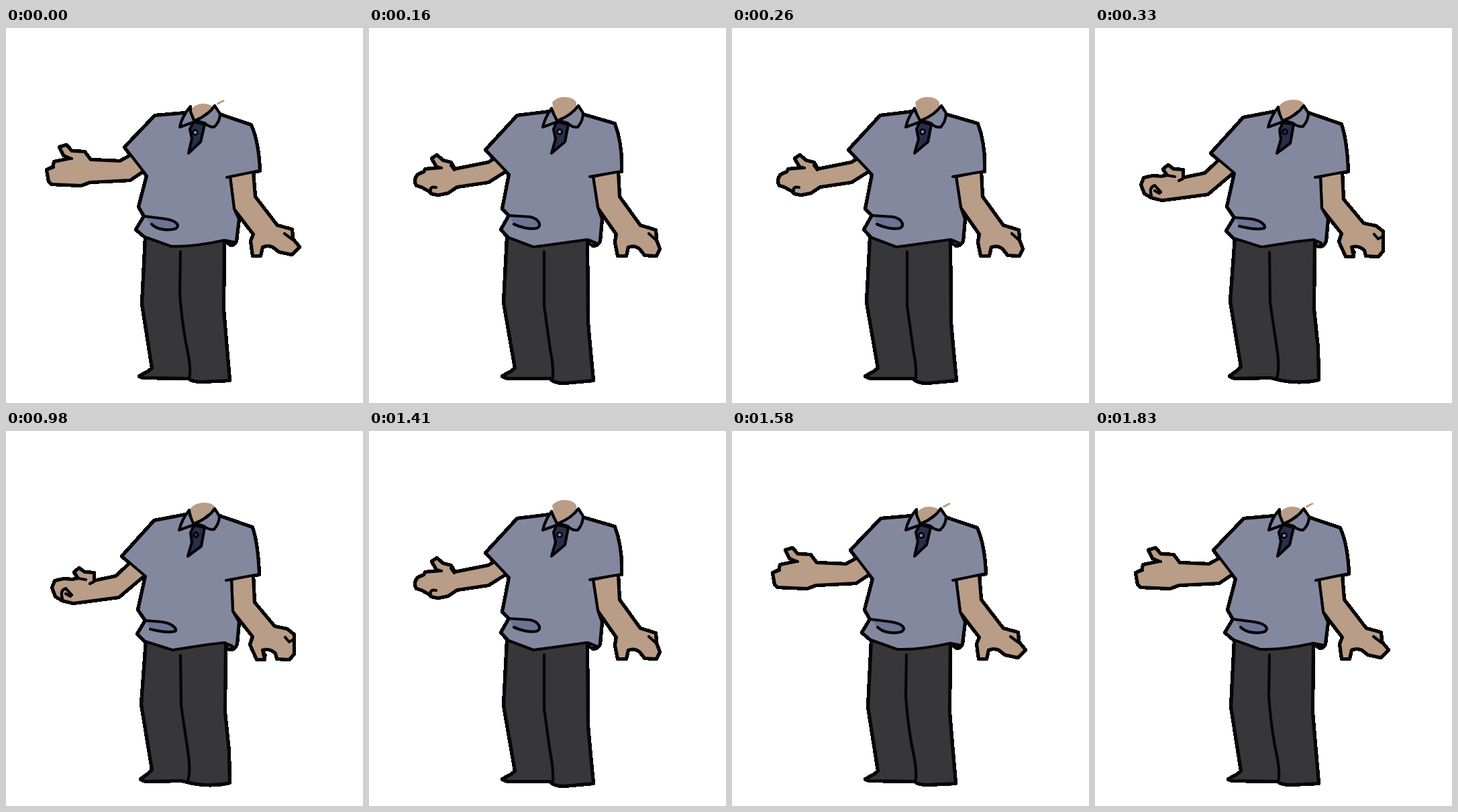
Write an HTML page that moves like this. It is 532 px wide and 560 px high and loops after 2000 ms.

```html
<!DOCTYPE html>
<html lang="en">
<head>
<meta charset="utf-8">
<title>Shrugging figure</title>
<style>
  html, body { margin: 0; width: 100%; height: 100%; overflow: hidden; background: #fff; }
  svg { display: block; width: 100%; height: 100%; }
  path, circle { stroke: #050507; stroke-width: 4.2; stroke-linejoin: round; stroke-linecap: round; }
  .edge { stroke: #000; stroke-width: 6.4; shape-rendering: crispEdges; }
  .skin { fill: #b99d87; }
  .shirt { fill: #84889f; }
  .shade { fill: #6e7396; }
  .dark { fill: #373739; }
  .navy { fill: #2a2e4c; }
  .line { fill: none; }
  .bare { stroke: none; }
</style>
</head>
<body>
<svg id="stage" viewBox="0 0 532 560"></svg>
<script>
const LOOP = 2000;
const SVG = "http://www.w3.org/2000/svg";

// Part name -> css class, in painting order.
const PARTS = {
  pants: "dark", seam: "line",
  armL: "skin", armR: "skin", fingers: "line",
  shirt: "shirt", lining: "shade", fold: "shade",
  neck: "skin bare", spike: "skin bare",
  placket: "navy", collarL: "shirt", collarR: "shirt"
};
const OUTER = ["pants", "armL", "armR", "shirt"];

const open = {
  pants: "M208 313L203 412L218 508L212 513L199 520L204 522L272 523Q278 528 292 528L333 526L329 480L324 420L325 316Z",
  seam: "M260 334L259 395Q261 430 268 470Q277 510 273 523",
  armL: "M188 189L170 199L126 197L117 185L98 184L90 175L80 178L86 190L96 195L72 200L70 208L61 212L64 229L68 233L112 235L125 230L185 227L207 212Z",
  armR: "M334 222L340 270L369 308L365 318L368 340L379 340L382 327Q390 323 398 327L407 334L426 338L437 327L427 315L426 301L404 295L371 252L368 214Z",
  fingers: "M86 191L98 195M62 211L71 208M415 307L427 316",
  lining: "M326 317L341 320L335 324Z",
  shirt: "M222 131L268 127L318 129L365 145C374 165 377 190 378 213L329 223L334 222L340 270L347 285L343 318Q341 324 335 324L325 317Q280 327 246 326L207 312L194 301L206 281L198 267L210 221L177 178Z",
  fold: "M206 281L237 285C256 288 260 296 252 300C240 303 225 301 217 293",
  neck: "M275 122Q283 113 293 113Q303 113 309 118L281 139Z",
  spike: "M314 112L324 107L326 109L315 115Z",
  placket: "M280 140L296 144L290 170L272 187L277 165L274 151Z",
  collarL: "M275 117Q262 132 259 148Q270 144 281 140L275 125Z",
  collarR: "M311 116Q302 130 282 138L296 142Q302 148 310 148Q319 140 319 128Z",
  button: [282, 156, "#84889f"]
};

const half = {
  pants: "M206 313L201 410L218 508L212 513L199 520L206 523L270 523Q276 530 290 530L334 526L330 485L326 440L325 316Z",
  seam: "M261 334L261 415L270 480Q275 505 274 522",
  armL: "M188 195L178 201L128 211L122 201L110 198L101 190L94 195L101 207L108 209L84 211L82 215L73 219Q66 227 71 235L78 237L89 243L93 247L103 249L118 246L131 237L178 230L205 213Z",
  armR: "M334 222L341 268L369 308L367 320L371 340L383 340L386 327Q396 323 404 330L411 339L428 340L433 330L428 317L427 302L404 295L373 252L371 214Z",
  fingers: "M98 208L108 209M122 205L127 212M92 244Q90 236 100 238M417 307L428 317",
  lining: "M326 316L338 321L336 325L329 323Z",
  shirt: "M221 131L270 125L318 129L366 143C374 165 377 190 376 214L329 222L334 222L341 268L347 285L344 318Q341 325 334 325L325 316L245 327L208 313L197 301L209 280L199 270L209 219L174 182Z",
  fold: "M209 280L240 282C254 285 258 296 250 299C240 301 226 298 216 293",
  neck: "M273 111Q280 103 291 103Q304 103 309 111L309 120L281 139L275 122Z",
  spike: "",
  placket: "M280 140L297 144L292 170L272 187L278 166L275 151Z",
  collarL: "M272 120Q262 134 259 148Q270 144 281 140L274 126Z",
  collarR: "M312 116Q302 130 282 138L296 142Q303 149 311 148Q319 139 319 127Z",
  button: [284, 155, "#84889f"]
};

const shrug = {
  pants: "M209 313L202 408L218 506L212 512L201 520L208 523L262 522Q300 533 333 525L332 478L326 420L327 316Z",
  seam: "M260 335L261 410Q266 445 272 485Q275 510 271 523",
  armL: "M185 197L164 217L131 224L131 212L117 211L109 205L102 211L108 220L99 222L86 221L73 224L69 234L74 247L84 253L100 257L168 248L207 215Z",
  armR: "M336 222L338 269L368 307L364 319L374 341L385 341L382 327Q393 323 402 332L404 340L422 341L429 333L429 304L419 296L400 292L370 256L368 214Z",
  fingers: "M107 220L119 222M131 225L125 228M84 250Q80 238 89 235L98 245M89 243L96 247M416 308L422 315L429 311M382 327L387 335",
  lining: "M327 317L337 321L336 326L330 325Z",
  shirt: "M221 134L268 125L318 127L367 144C374 165 376 190 377 214L328 223L336 222L338 269L347 285L344 318Q341 327 333 326L326 316L300 319L248 327L207 314L196 303L208 283L197 267L208 217L173 187Z",
  fold: "M208 283L232 285C248 287 256 296 252 299C242 302 228 299 215 296",
  neck: "M274 117Q281 107 295 107Q309 107 312 115L281 139Z",
  spike: "",
  placket: "M280 141L296 144L291 172L271 187L277 166L275 152Z",
  collarL: "M273 118Q262 132 258 148Q269 144 280 140L274 126Z",
  collarR: "M311 116Q302 130 281 138L295 142Q302 148 310 147Q318 138 318 127Z",
  button: [283, 155, "#2a2e4c"]
};

// Each pose holds until its end time, then cuts.
const timeline = [[160, open], [330, half], [1410, shrug], [1580, half], [LOOP, open]];

const stage = document.getElementById("stage");

function add(tag, className) {
  const el = document.createElementNS(SVG, tag);
  el.setAttribute("class", className);
  return stage.appendChild(el);
}

const edge = add("path", "edge");
const nodes = {};
for (const name in PARTS) nodes[name] = add("path", PARTS[name]);
const button = add("circle", "");
button.setAttribute("r", 3.6);
button.style.strokeWidth = 2.6;

let shown = null;

function render(ms) {
  const t = ms % LOOP;
  const pose = timeline.find(([end]) => t < end)[1];
  if (pose === shown) return;
  shown = pose;
  edge.setAttribute("d", OUTER.map(name => pose[name]).join(""));
  for (const name in nodes) nodes[name].setAttribute("d", pose[name]);
  const [x, y, fill] = pose.button;
  button.setAttribute("cx", x);
  button.setAttribute("cy", y);
  button.setAttribute("fill", fill);
}

const start = performance.now();
function tick() {
  render(performance.now() - start);
  requestAnimationFrame(tick);
}
tick();
</script>
</body>
</html>
```
